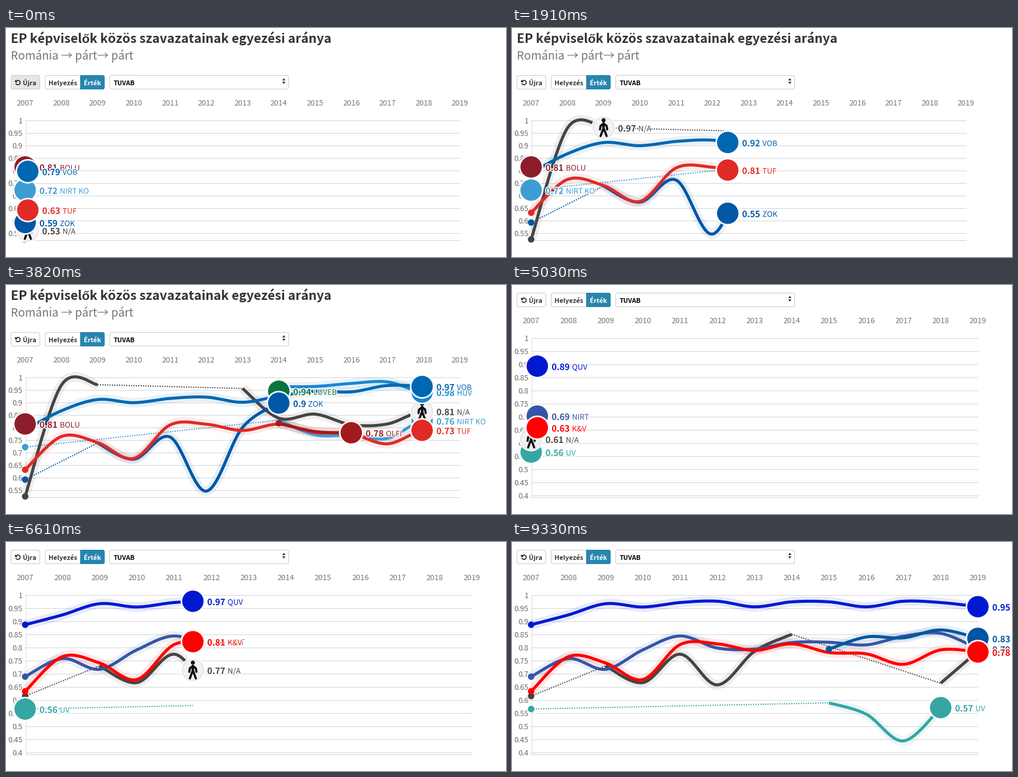
Write a matplotlib script that moves like this. It is 836 by 384 pixels and loops after 9.92 s.

```python
import numpy as np
import matplotlib.pyplot as plt
from matplotlib.animation import FuncAnimation
from matplotlib.patches import Circle, FancyBboxPatch, Polygon, Rectangle
from matplotlib.patheffects import withStroke

W, H, DPI = 836, 384, 64
PX = 72 / DPI            # one pixel in points
STEP, FRAMES = 62, 160   # 9920 ms per loop
SWITCH = 5022            # second chart appears
SPEED = .1743            # pixels per ms along the time axis
LEFT = 32

plt.rcParams["font.family"] = ["Noto Sans CJK JP", "Liberation Sans", "DejaVu Sans"]

fig = plt.figure(figsize=(W / DPI, H / DPI), dpi=DPI, facecolor="white")


def stage():
    ax = fig.add_axes([0, 0, 1, 1])
    ax.set_xlim(0, W)
    ax.set_ylim(H, 0)
    ax.axis("off")
    return ax


def text(ax, x, y, s, size, color="#333333", **kw):
    return ax.text(x, y, s, fontsize=size * PX, color=color, va="baseline", **kw)


def box(ax, x0, x1, top, fill="white", edge="#cccccc", r=3):
    patch = FancyBboxPatch((x0 + r + .5, top + r + .5), x1 - x0 - 2 * r - 1, 23 - 2 * r,
                           boxstyle=f"round,pad={r}", fc=fill, ec=edge, lw=PX)
    return ax.add_patch(patch)


def controls(ax, top):
    """Toolbar row; returns the replay button."""
    blue, base = "#2885ad", top + 17
    replay = box(ax, 8, 57, top)
    a = np.radians(np.linspace(150, -140, 30))
    cx, cy = 20, top + 12.5
    ax.plot(cx + 3.7 * np.cos(a), cy + 3.7 * np.sin(a), color="#222222", lw=1.6 * PX)
    ax.add_patch(Polygon([(15.3, cy - 4.6), (15.3, cy - .2), (19.7, cy - .2)], fc="#222222", lw=0))
    box(ax, 65, 165, top)
    box(ax, 124, 165, top, blue, blue)
    ax.add_patch(Rectangle((124, top), 5, 24, fc=blue, lw=0))
    box(ax, 173, 473, top)
    for x, label, color in ((28, "Újra", "#333333"), (71, "Helyezés", "#333333"),
                            (130, "Érték", "white"), (180, "TUVAB", "black")):
        text(ax, x, base, label, 10.8, color, weight="bold")
    for tip, foot in ((5, 9), (15, 11)):
        ax.add_patch(Polygon([(464.5, top + tip), (462, top + foot), (467, top + foot)],
                             fc="#333333", lw=0))
    return replay


def cardinal(x, y, n=24):
    """Cardinal spline with doubled end points, sampled n times per span."""
    p = np.column_stack([x, y])
    q = np.vstack([p[:1], p, p[-1:]])
    m = (q[2:] - q[:-2]) / 2
    s = np.linspace(0, 1, n, endpoint=False)[:, None]
    spans = [(2 * s**3 - 3 * s**2 + 1) * a + (s**3 - 2 * s**2 + s) * u
             + (3 * s**2 - 2 * s**3) * b + (s**3 - s**2) * v
             for a, b, u, v in zip(p, p[1:], m, m[1:])]
    return np.vstack(spans + [p[-1:]]).T


def walker():
    """Arm and leg strokes of a pedestrian, mirrored about the body."""
    arm, leg = [(0, -7), (5, -3), (6, 3)], [(0, -7), (0, 1), (2.5, 7), (5, 14)]
    strokes = [[(side * x, y) for x, y in limb] + [(np.nan, np.nan)]
               for side in (-1, 1) for limb in (arm, leg)]
    return np.vstack(strokes).T


WALKER = walker()


class Series:
    def __init__(self, chart, name, color, runs, z):
        ax, self.chart = chart.ax, chart
        self.runs = []
        for start, vals in runs:
            x = chart.x(start + np.arange(len(vals)))
            y = chart.y(np.array(vals))
            self.runs.append((x[0], vals, *cardinal(x, y)))
        x0, _, _, ys = self.runs[0]
        self.start = x0
        person = name == "N/A"
        low, top = 3 + z / 100, 5 + z

        def line(width, zorder, **kw):
            return ax.plot([], [], color=color, lw=width * PX, zorder=zorder, **kw)[0]

        self.halo = line(16, 2, alpha=.09, solid_capstyle="butt")
        self.dotted = line(1.9, low, ls=(0, (1, 1.1)))
        self.line = line(5, low, solid_capstyle="butt")
        dot = ax.add_patch(Circle((x0, ys[0]), 5.4, fc=color, lw=0, zorder=low + .5))
        self.badge = ax.add_patch(Circle((0, 0), 19.2, fc="#f4f1f6" if person else color,
                                         ec="white", lw=2.6 * PX, zorder=top))
        self.parts = [self.halo, self.dotted, self.line, dot, self.badge]
        self.body = None
        if person:
            ink = "#0c0c0c"
            self.rim = ax.add_patch(Circle((0, 0), 17.6, fc="none", ec="#d2ccd4", lw=.8 * PX,
                                           zorder=top + .1))
            self.body = ax.plot([], [], color=ink, lw=3.6 * PX, zorder=top + .2,
                                solid_capstyle="round", solid_joinstyle="round")[0]
            self.head = ax.add_patch(Circle((0, 0), 3.4, fc=ink, lw=0, zorder=top + .2))
            self.parts += [self.rim, self.body, self.head]
        label = dict(zorder=top + .3,
                     path_effects=[withStroke(linewidth=3 * PX, foreground="white")])
        self.value = text(ax, 0, 0, "", 14.4, color, weight="bold", **label)
        self.name = text(ax, 0, 0, name, 12.6, color, **label)
        self.parts += [self.value, self.name]

    def update(self, now):
        shown = now >= self.start - 1e-6
        for part in self.parts:
            part.set_visible(shown)
        if not shown:
            return
        lx, ly, dx, dy = [], [], [], []
        end = None
        for x0, vals, cx, cy in self.runs:
            if end and now > end[0]:
                f = min(1, (now - end[0]) / (x0 - end[0]))
                dx += [end[0], end[0] + f * (x0 - end[0]), np.nan]
                dy += [end[1], end[1] + f * (cy[0] - end[1]), np.nan]
            if now < x0 - 1e-6:
                break
            bx = min(now, cx[-1])
            by = np.interp(bx, cx, cy)
            keep = cx < bx
            lx += [*cx[keep], bx, np.nan]
            ly += [*cy[keep], by, np.nan]
            val = vals[int((bx - x0) / self.chart.year + 1e-6)]
            end = cx[-1], cy[-1]
        self.line.set_data(lx, ly)
        self.halo.set_data(lx, ly)
        self.dotted.set_data(dx, dy)
        self.badge.center = bx, by
        if self.body:
            self.rim.center = bx, by
            self.body.set_data(WALKER[0] + bx, WALKER[1] + by)
            self.head.center = bx, by - 12.5
        label = str(round(float(val), 2))
        self.value.set_text(label)
        self.value.set_position((bx + 24, by + 6.5))
        self.name.set_position((bx + 24 + (34 if len(label) > 3 else 25), by + 6))


class Chart:
    def __init__(self, bar, top, right, unit, ticks, series):
        self.ax = ax = stage()
        self.top, self.right, self.unit = top, right, unit
        self.year = (right - LEFT) / 12
        self.replay = controls(ax, bar)
        for i in range(13):
            text(ax, self.x(i), bar + 51.5, str(2007 + i), 12.8, "#777777", ha="center")
        for v in 1 - .05 * np.arange(ticks):
            y = self.y(v)
            ax.plot([LEFT, right], [y, y], color="#d3d6da", lw=PX, zorder=1)
            text(ax, 27.5, y + 5, f"{v:.3g}", 12.5, "#6c6c6c", ha="right")
        ax.plot([LEFT, right], [355.5, 355.5], color="#d6d3d8", lw=PX, zorder=1)
        ax.plot([LEFT + .5] * 2, [top, 355.5], color="#dddddd", lw=PX, zorder=1)
        self.series = [Series(self, *s, z) for z, s in enumerate(series)]

    def x(self, year):
        return LEFT + self.year * year

    def y(self, value):
        return self.top + (1 - value) * self.unit

    def update(self, travel):
        for s in self.series:
            s.update(min(LEFT + travel, self.right))


# agreement by year, counted from 2007; most lines follow from a few base curves
yr = np.arange(13)
red = np.array([.632, .764, .74, .677, .81, .813, .788, .813, .78, .775, .735, .79, .782])
liberal = [.688, .757, .716, .79, .843, .797, .793, .818, .819, .809, .842, .853, .794]
swing = np.array([.738, .674, .762, .547, .80, .897])
mixed = red[2:8] + .55 * (swing - red[2:8]) - .01
top_line = .967 - .07 * np.exp(-yr**2 / 2.2) + .013 * np.cos(2 * np.pi * (yr - 4.6) / 2.9)
closing = .008 + .047 / (1 + np.exp(2 * (yr - 7.9))) + .04 * np.exp(-3 * yr)
near_red = red + .013 - .025 * np.cos(2 * np.pi * (yr - 8.4) / 5.2)

parties = [
    ("BOLU", "#8e1d2c", [(0, [.814])]),
    ("LUVEB", "#08753f", [(7, [.944])]),
    ("NIRT KO", "#3d9dd3", [(0, [.722]), (7, near_red[7:])]),
    ("N/A", "#444444", [(0, [.526, .968, .97]), (6, [.955, .837, .853, .811, .814, .865, .84])]),
    ("HUV", "#1787d2", [(7, [.962, .963, .975, .981, .94, .95])]),
    ("ZOK", "#0057a6", [(0, [.593]), (2, swing)]),
    ("VOB", "#0068b2", [(0, top_line - closing)]),
    ("TUF", "#e02a26", [(0, red)]),
    ("OLFI", "#a31a1c", [(7, red[7:10] + .004)]),
]

groups = [
    ("UV", "#36a6a4", [(0, [.5645]), (8, [.588, .545, .443, .57])]),
    ("N/A", "#444444", [(0, [.614]), (2, mixed), (11, [.663, .785])]),
    ("NIRT", "#3556a5", [(0, liberal)]),
    ("JUZ", "#0056a0", [(8, [.793, .839, .836, .866, .834])]),
    ("QUV", "#0019d0", [(0, top_line)]),
    ("K&V", "#ff0000", [(0, red)]),
]

first = Chart(79, 154.5, 759, 422, 10, parties)
second = Chart(13, 88.5, 779, 440, 13, groups)
text(first.ax, 8, 25, "EP képviselők közös szavazatainak egyezési aránya", 21.2, weight="bold")
text(first.ax, 8, 53, "Románia → párt→ párt", 19.1, "#777777", weight="light")


def update(i):
    t = i * STEP
    early = t < SWITCH
    first.ax.set_visible(early)
    second.ax.set_visible(not early)
    if early:
        first.replay.set_facecolor("#e6e6e6" if i == 0 else "white")
        first.update(4.5 + SPEED * t)
    else:
        second.update(SPEED * (t - 4963))
    return []


anim = FuncAnimation(fig, update, frames=FRAMES, interval=STEP, repeat=True, repeat_delay=0)
plt.show()
```
